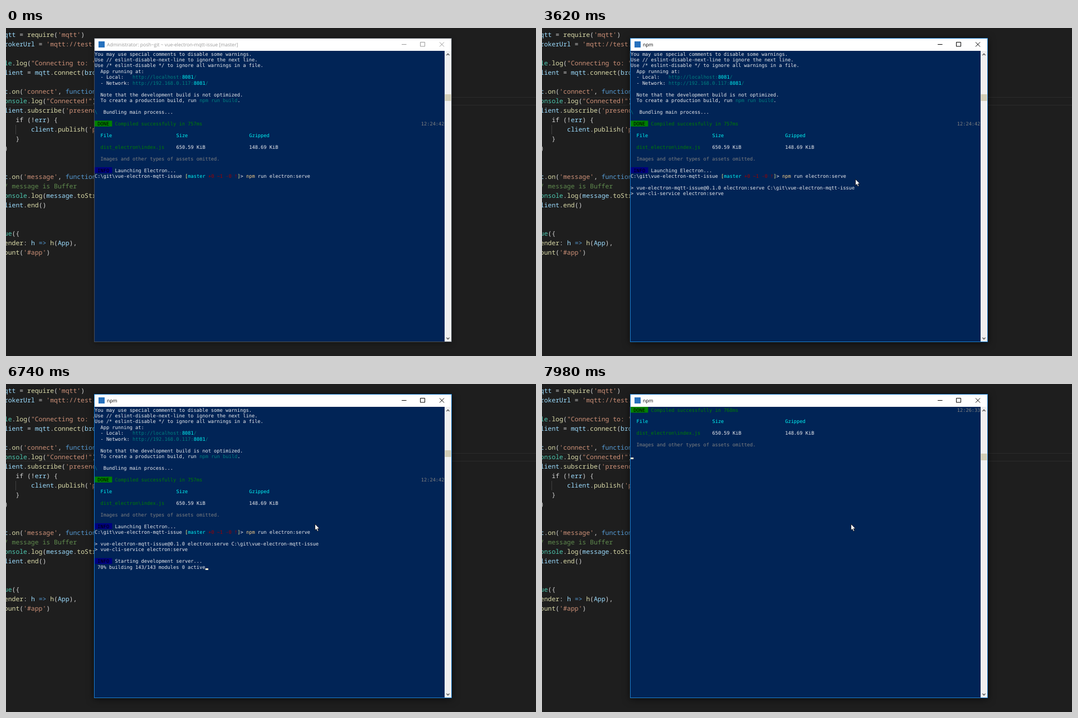
Recreate the animation shown at these times as an HTML page. Size 951x589 px, loop 8 s.

```html
<!DOCTYPE html>
<html lang="en">
<head>
<meta charset="utf-8">
<title>Terminal session</title>
<style>
  html, body { margin: 0; width: 100%; height: 100%; overflow: hidden; background: #1e1e1e; }
  svg { display: block; }
  text { white-space: pre; text-rendering: geometricPrecision; }
  .code { font: 11.45px "Noto Sans Mono", monospace; }
  .term { font: 8.69px "DejaVu Sans Mono", monospace; }
  .title { font: 8.61px "Open Sans", sans-serif; }
  #frame { filter: drop-shadow(0 2px 5px rgba(0, 0, 0, .35)); }
  .active #frame { filter: drop-shadow(0 2px 7px rgba(0, 0, 0, .6)); }
  #edge { fill: none; stroke: #4a5058; }
  .active #edge { stroke: #1c7fd0; }
  #title { fill: #999; }
  #buttons { fill: none; stroke: #999; }
  .active #title { fill: #000; }
  .active #buttons { stroke: #000; }
</style>
</head>
<body>
<svg id="stage" width="951" height="589" viewBox="0 0 951 589">
  <rect width="951" height="589" fill="#1e1e1e"/>
  <path d="M0 124.5H951M0 138.5H951" stroke="#2c2c2c"/>
  <path d="M17.5 174V191" stroke="#404040"/>
  <g id="editor" class="code"></g>

  <rect id="frame" x="158" y="18" width="642" height="546" fill="#012456"/>
  <rect x="159" y="19" width="640" height="22" fill="#fff"/>
  <rect x="166" y="24" width="11" height="11" fill="#2671be"/>
  <text id="title" class="title" x="181" y="32.9"></text>
  <path id="buttons" d="M710 29.5h8.5M743.5 25.5h8v7.5h-8zM778 25.5l8 8m0-8l-8 8"/>
  <rect x="787" y="41" width="12" height="522" fill="#f0f0f0"/>
  <path d="M790.5 49l2.5-2.8 2.5 2.8M790.5 556l2.5 2.8 2.5-2.8" fill="none" stroke="#505050" stroke-width="1.3"/>
  <rect id="thumb" x="787.5" width="11" height="12" fill="#d2cdb6"/>
  <rect id="edge" x="158.5" y="18.5" width="641" height="545"/>

  <g id="terminal" class="term"></g>
  <rect id="caret" width="5.2" height="3" fill="#f6ead0"/>
  <path id="mouse" d="M.5.5V11.6L3 9.4 4.7 13.4 6.6 12.6 4.9 8.7H8.4Z" fill="#fff" stroke="#000" stroke-width=".7"/>
</svg>
<script>
const $ = id => document.getElementById(id);
const NS = 'http://www.w3.org/2000/svg';
const LOOP = 8000;
const CELL = 5.23, ROW = 10.45, LEFT = 159, TOP = 41;

const C = {
  w: '#eeedf0', c: '#00f5f5', t: '#008080', g: '#008000', s: '#808080', r: '#a00000',
  y: '#f0f08c', o: '#f8cd86', k: '#000',
  p: '#d4d4d4', v: '#9cdcfe', f: '#dcdcaa', q: '#ce9178', b: '#569cd6', n: '#4ec9b0', m: '#608b4e'
};

function add(parent, tag, attrs, content) {
  const el = document.createElementNS(NS, tag);
  for (const key in attrs) el.setAttribute(key, attrs[key]);
  if (content) el.textContent = content;
  parent.appendChild(el);
  return el;
}

// Runs are "colour key + text" strings laid out one after another.
function runs(parent, x, y, cell, list) {
  for (const run of list) {
    add(parent, 'text', { x, y, fill: C[run[0]] }, run.slice(1));
    x += (run.length - 1) * cell;
  }
}

const code = [
  [0, 0, 'vqtt', 'p = ', 'frequire', 'p(', "q'mqtt'", 'p)'],
  [1, 0, 'vrokerUrl', 'p = ', "q'mqtt://test."],
  [3, 0, 'nle', 'p.', 'flog', 'p(', 'q"Connecting to: "'],
  [4, 0, 'vlient', 'p = ', 'vmqtt', 'p.', 'fconnect', 'p(', 'vbro'],
  [6, 0, 'vt', 'p.', 'fon', 'p(', "q'connect'", 'p, ', 'bfunction'],
  [7, 0, 'nonsole', 'p.', 'flog', 'p(', 'q"Connected!"', 'p)'],
  [8, 0, 'vlient', 'p.', 'fsubscribe', 'p(', "q'presenc"],
  [9, 3, 'pif (!', 'verr', 'p) {'],
  [10, 7, 'vclient', 'p.', 'fpublish', 'p(', "q'p"],
  [11, 3, 'p}'],
  [12, 0, 'p)'],
  [15, 0, 'vt', 'p.', 'fon', 'p(', "q'message'", 'p, ', 'bfunction'],
  [16, 0, 'm/ message is Buffer'],
  [17, 0, 'nonsole', 'p.', 'flog', 'p(', 'vmessage', 'p.', 'ftoStr'],
  [18, 0, 'vlient', 'p.', 'fend', 'p()'],
  [21, 0, 'nue', 'p({'],
  [22, 0, 'fender', 'p: ', 'vh', 'p ', 'b=>', 'p ', 'fh', 'p(', 'vApp', 'p),'],
  [23, 0, 'fount', 'p(', "q'#app'", 'p)']
];
for (const [row, col, ...list] of code)
  runs($('editor'), -3.2 + col * 6.87, 15.9 + row * 17, 6.87, list);

const cellX = col => LEFT + col * CELL;
const baseline = row => TOP + row * ROW + 8.5;

function line(page, row, col, ...list) {
  runs(page, cellX(col), baseline(row), CELL, list);
}

function badge(page, row, label, fill) {
  add(page, 'rect', { x: LEFT, y: TOP + row * ROW, width: 6 * CELL, height: ROW, fill });
  line(page, row, 1, 'k' + label);
}

function done(page, row, ms, time) {
  badge(page, row, 'DONE', C.g);
  line(page, row, 7, `gCompiled successfully in ${ms}ms`);
  line(page, row, 112, 's' + time);
}

function server(page, row) {
  line(page, row, 2, 'wApp running at:');
  line(page, row + 1, 2, 'w- Local:   ', 'thttp://localhost:', 'c8081', 't/');
  line(page, row + 2, 2, 'w- Network: ', 'thttp://192.168.0.117:', 'c8081', 't/');
  line(page, row + 4, 2, 'wNote that the development build is not optimized.');
  line(page, row + 5, 2, 'wTo create a production build, run ', 'tnpm run build', 'w.');
  line(page, row + 7, 3, 'wBundling main process...');
}

function assets(page, row) {
  [[2, 'cFile', 'gdist_electron\\index.js'], [28, 'cSize', 'w650.59 KiB'], [53, 'cGzipped', 'w148.69 KiB']]
    .forEach(([col, head, value]) => {
      line(page, row, col, head);
      line(page, row + 2, col, value);
    });
  line(page, row + 4, 2, 'sImages and other types of assets omitted.');
}

const group = parent => add(parent, 'g', {});
const live = (parent, row) => add(parent, 'text', { x: LEFT, y: baseline(row), fill: C.w });

const first = group($('terminal'));
line(first, 0, 0, 'wYou may use special comments to disable some warnings.');
line(first, 1, 0, 'wUse // eslint-disable-next-line to ignore the next line.');
line(first, 2, 0, 'wUse /* eslint-disable */ to ignore all warnings in a file.');
server(first, 3);
line(first, 10, 0, 't\\');
done(first, 12, 757, '12:24:42');
assets(first, 14);
badge(first, 20, 'INFO', '#000080');
line(first, 20, 7, 'wLaunching Electron...');
line(first, 21, 0, 'wC:\\git\\vue-electron-mqtt-issue ', 'y[', 'cmaster', 'r +0 ~1 -0 !', 'y]', 'w> ', 'onpm', 'w run electron:serve');

const script = group(first);
line(script, 23, 0, 'w> vue-electron-mqtt-issue@0.1.0 electron:serve C:\\git\\vue-electron-mqtt-issue');
line(script, 24, 0, 'w> vue-cli-service electron:serve');
const info = group(first);
badge(info, 26, 'INFO', '#000080');
line(info, 26, 7, 'wStarting development server...');
const progress = live(first, 27);

const second = group($('terminal'));
done(second, 0, 2174, '12:26:32');
server(second, 2);
const spinner = live(second, 9);
spinner.setAttribute('fill', C.t);

const third = group($('terminal'));
done(third, 0, 768, '12:26:33');
assets(third, 2);

// Step tables: each entry holds from its time until the next one.
const building = [
  [0, ''],
  [5100, ' 10% building 1/1 modules 0 active'],
  [5180, ' 10% building 2/5 modules 3 active ...dules\\webpack\\hot\\dev-server.js'],
  [5260, ' 10% building 6/15 modules 9 active ...ck-dev-server\\client\\utils\\reloadApp.js'],
  [5410, ' 12% building 22/34 modules 12 active ...node_modules\\mqtt\\lib\\client.js'],
  [5487, ' 17% building 47/58 modules 11 active ...node_modules\\url\\url.js'],
  [5563, ' 22% building 71/83 modules 12 active ...modules\\readable-stream\\readable.js'],
  [5640, ' 28% building 95/104 modules 9 active ...node_modules\\inherits\\inherits.js'],
  [5717, ' 33% building 112/121 modules 9 active ...node_modules\\core-util-is\\util.js'],
  [5793, ' 38% building 131/137 modules 6 active ...modules\\process\\browser.js'],
  [5870, ' 40% building 138/141 modules 3 active ...pp.vue?vue&type=style&index=0&lang=css&'],
  [6270, ' 40% building 140/142 modules 2 active ...ue-style-loader\\lib\\addStylesClient.js'],
  [6340, ' 40% building 142/143 modules 1 active ...s\\vue-style-loader\\lib\\listToStyles.js'],
  [6740, ' 70% building 143/143 modules 0 active'],
  [6818, ' 80% chunk graph'],
  [6896, ' 86% module ids'],
  [6970, ' 89% hashing'],
  [7040, ' 90% chunk assets processing'],
  [7120, ' 95% emitting']
];
const carets = [
  [0], [1550, 21, 74], [1990, 22, 0], [2080], [2610, 26, 0], [3620], [4020, 27, 0], [4720],
  [5100, 27, 'end'], [7210], [7980, 8, 0]
];
const spins = [[0, '-'], [7360, '\\'], [7590, '|'], [7670, '/'], [7820, '-']];
const thumbs = [[0, 119], [7210, 122], [7900, 125]];

// Pointer moves: start, end, number of updates, target.
const moves = [
  [140, 750, 9, 553, 264], [1920, 2080, 3, 562, 271], [5100, 5260, 3, 553, 264], [5410, 5870, 7, 554, 251]
];

const at = (table, t) => table.filter(entry => entry[0] <= t).pop();
const show = (el, on) => el.setAttribute('visibility', on ? 'visible' : 'hidden');
const toggle = (el, on) => { el.style.display = on ? '' : 'none'; };

function pointer(t) {
  let x = 936, y = 640;
  for (const [start, end, n, tx, ty] of moves) {
    if (t < start) break;
    const step = Math.floor((t - start) / (end - start) * (n - 1) + .001) + 1;
    const left = 1 - Math.min(1, step / n);
    const p = 1 - left * left;
    x += (tx - x) * p;
    y += (ty - y) * p;
  }
  return [x, y];
}

function draw(t) {
  $('stage').classList.toggle('active', t >= 990);
  $('title').textContent = t < 1990 ? 'Administrator: posh~git ~ vue-electron-mqtt-issue [master]' : 'npm';
  $('thumb').setAttribute('y', at(thumbs, t)[1]);

  toggle(first, t < 7210);
  toggle(second, t >= 7210 && t < 7900);
  toggle(third, t >= 7900);
  toggle(script, t >= 2610);
  toggle(info, t >= 4020);
  const status = at(building, t)[1];
  progress.textContent = status;
  spinner.textContent = at(spins, t)[1];

  const [, row, col] = at(carets, t);
  show($('caret'), row !== undefined);
  if (row !== undefined) {
    $('caret').setAttribute('x', cellX(col === 'end' ? status.length : col));
    $('caret').setAttribute('y', Math.round(TOP + row * ROW + 7.6));
  }

  show($('mouse'), t >= 140);
  $('mouse').setAttribute('transform', `translate(${pointer(t)})`);
}

const begin = performance.now();
function tick() {
  draw((performance.now() - begin) % LOOP);
  requestAnimationFrame(tick);
}
tick();
</script>
</body>
</html>
```
